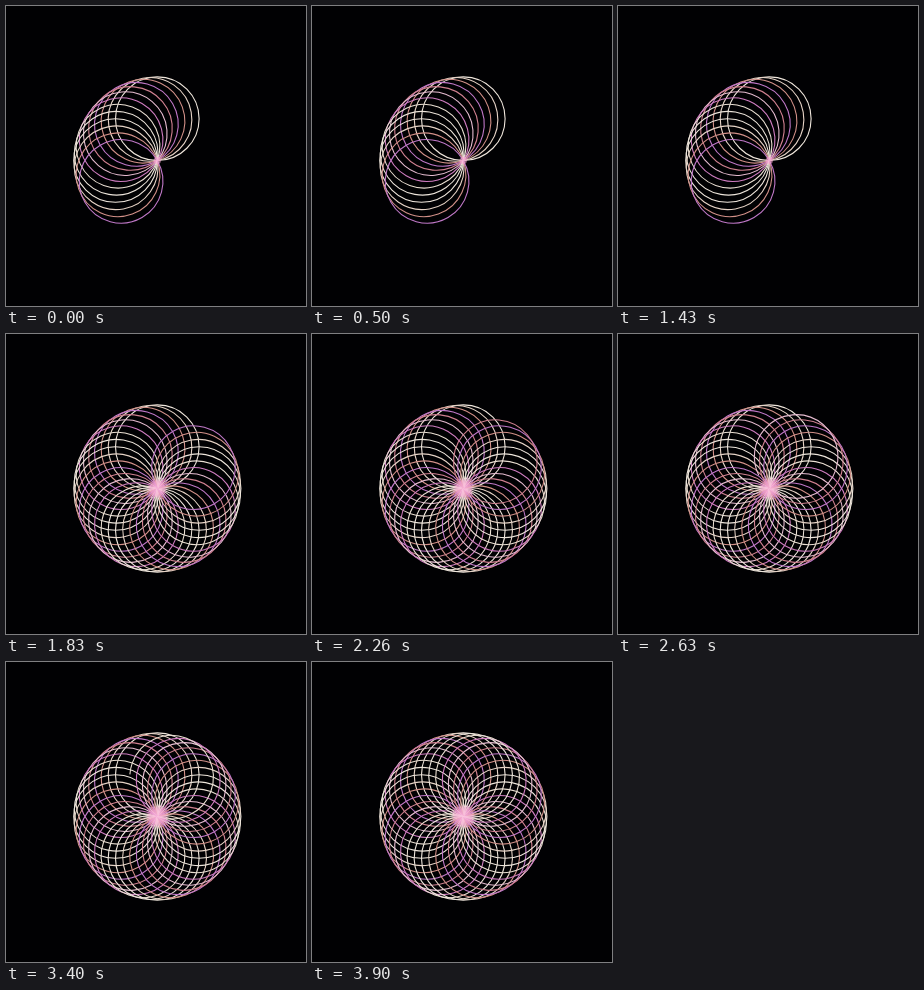
Write an HTML page with a canvas that moves like this. It is 300 by 300 pixels and loops after 3930 ms.

```html
<!DOCTYPE html>
<html lang="en">
<head>
<meta charset="utf-8">
<title>Circle rosette</title>
<style>
  html, body { margin: 0; width: 100%; height: 100%; overflow: hidden; background: #010103; }
  canvas { display: block; }
</style>
</head>
<body>
<canvas id="stage" width="300" height="300"></canvas>
<script>
const ctx = document.getElementById('stage').getContext('2d');
const LOOP = 3930;
const CUT = 1600;
const CIRCLE_TIME = 414;
const HUB = { x: 151.3, y: 154.5 };
const RADIUS = 41.8;
const STEP = Math.PI / 18;
const COLORS = ['#efe6dc', '#e6d3c6', '#d29088', '#c078c8', '#d08090', '#e6bcd0', '#cf7cc0', '#eadfd2', '#ece4da'];

// Circles drawn so far: a still opening, a cut, then steady drawing up to 36.
function circlesDrawn(time) {
  return time < CUT ? 13 : Math.min(36, 36 - (3900 - time) / CIRCLE_TIME);
}

// Every circle starts at the hub, each turned 10° counterclockwise.
function drawCircle(index, part) {
  const angle = -Math.PI / 2 - index * STEP;
  const from = angle + Math.PI;
  ctx.strokeStyle = COLORS[index % COLORS.length];
  ctx.beginPath();
  ctx.arc(HUB.x + RADIUS * Math.cos(angle), HUB.y + RADIUS * Math.sin(angle),
    RADIUS, from, from - Math.PI * 2 * part, true);
  ctx.stroke();
}

// The crowded lines melt into a pink glow at the hub.
function drawHub(radius) {
  const glow = ctx.createRadialGradient(HUB.x, HUB.y, 0, HUB.x, HUB.y, radius);
  glow.addColorStop(0, 'rgba(255, 190, 225, 0.8)');
  glow.addColorStop(0.7, 'rgba(250, 165, 212, 0.6)');
  glow.addColorStop(1, 'rgba(250, 165, 212, 0)');
  ctx.fillStyle = glow;
  ctx.fillRect(HUB.x - radius, HUB.y - radius, radius * 2, radius * 2);
}

const start = performance.now();

function render() {
  const count = circlesDrawn((performance.now() - start) % LOOP);
  ctx.fillStyle = '#010103';
  ctx.fillRect(0, 0, 300, 300);
  ctx.lineWidth = 1.1;
  for (let i = 0; i < count; i++) drawCircle(i, Math.min(1, count - i));
  drawHub(count / 3);
  requestAnimationFrame(render);
}

render();
</script>
</body>
</html>
```
